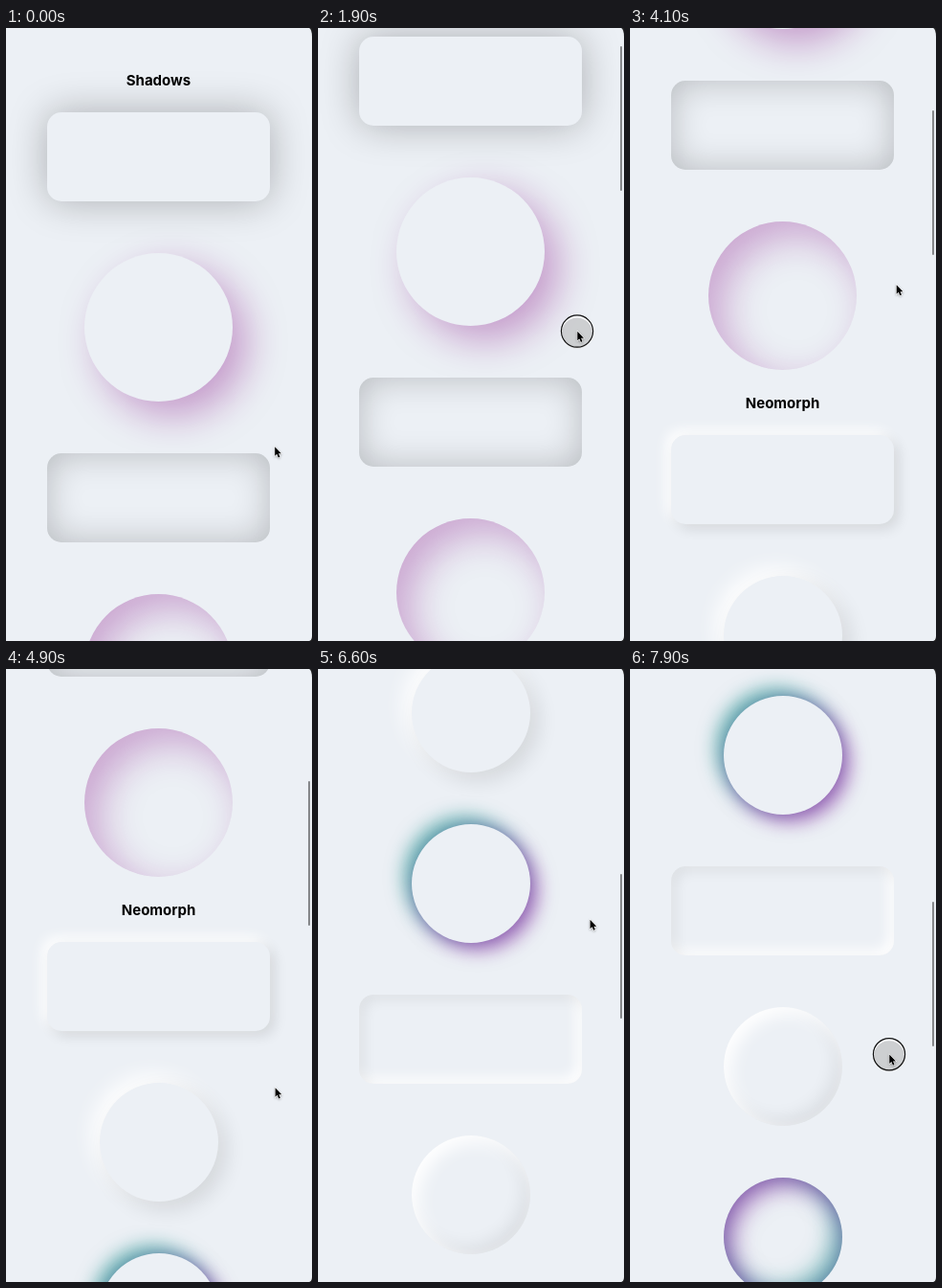
An HTML page that plays this animation: 320 by 640 pixels, repeating every 8 s.

```html
<!DOCTYPE html>
<html lang="en">
<head>
<meta charset="utf-8">
<title>Shadows</title>
<style>
html, body { margin: 0; width: 100%; height: 100%; overflow: hidden; background: #222; }
#stage { position: relative; width: 320px; height: 640px; overflow: hidden; background: #ecf0f5;
  border-radius: 0 3px 3px 0 / 0 9px 5px 0;
  --purple: rgba(98,0,140,.58); --teal: rgba(0,128,128,.62); }
#page, #cursor { position: absolute; left: 0; top: 0; }
#page { width: 319px; }
#page > * { position: absolute; background: #ecf0f5; }
#page > h2 { left: 0; width: 319px; margin: 0; text-align: center; color: #000;
  font: 700 15px/20px Inter, Roboto, sans-serif; background: none; }
.card { left: 43px; width: 233px; height: 93px; border-radius: 15px; }
.big, .disc { border-radius: 50%; }
.big { left: 82px; width: 155px; height: 155px; }
.disc { left: 98px; width: 124px; height: 124px; }
#bar { position: absolute; left: 316px; top: 0; width: 2px; height: 151px; border-radius: 1px; background: #85878a; }
#cursor { width: 0; height: 0; }
#cursor svg { position: absolute; left: -19.5px; top: -20px; }
</style>
</head>
<body>
<div id="stage">
  <div id="page">
    <h2 style="top:45px">Shadows</h2>
    <div class="card" style="top:88px; box-shadow:0 0 40px rgba(0,0,0,.28)"></div>
    <div class="big" style="top:235px; box-shadow:15px 15px 40px rgba(128,0,128,.36)"></div>
    <div class="card" style="top:444px; box-shadow:inset 0 0 36px rgba(0,0,0,.23)"></div>
    <div class="big" style="top:591px; box-shadow:inset 15px 15px 40px rgba(128,0,128,.31)"></div>
    <h2 style="top:771px">Neomorph</h2>
    <div class="card" style="top:814px; box-shadow:5px 5px 14px rgba(0,0,0,.11), -5px -5px 14px #fff"></div>
    <div class="disc" style="top:961px; box-shadow:8px 8px 22px rgba(0,0,0,.11), -8px -8px 22px #fff"></div>
    <div class="disc" style="top:1139px; box-shadow:7px 7px 20px var(--purple), -7px -7px 20px var(--teal)"></div>
    <div class="card" style="top:1317px; box-shadow:inset 5px 5px 14px rgba(0,0,0,.07), inset -5px -5px 14px #fff"></div>
    <div class="disc" style="top:1464px; box-shadow:inset 7px 7px 18px #fff, inset -7px -7px 18px rgba(0,0,0,.08)"></div>
    <div class="disc" style="top:1642px; box-shadow:inset 7px 7px 26px var(--purple), inset -7px -7px 26px var(--teal)"></div>
  </div>
  <div id="bar"></div>
  <div id="cursor">
    <svg width="44" height="46" viewBox="-20 -20 44 46">
      <g id="touch">
        <circle cy="1.2" r="17.2" fill="#fff" fill-opacity=".75"/>
        <circle cy="2" r="16" fill="#c9cacc" fill-opacity=".9"/>
        <circle r="16.6" fill="none" stroke="#111" stroke-width="1.2"/>
      </g>
      <path d="M0 0V10.8L2.4 8.6 4.1 12.6 6 11.8 4.3 7.9H7.6Z" transform="translate(.3 .3) scale(.88)"
        stroke="#fff" stroke-width="1.2" paint-order="stroke"
        style="filter:drop-shadow(0 1px 1px rgba(0,0,0,.3))"/>
    </svg>
  </div>
</div>
<script>
const LOOP = 8000, STEP = 100;
const GLIDE_TIME = 450;    // decay of the momentum after a release
const FINGER_RATIO = 1.1;  // finger travel per pixel of dragged scroll
const HAND_X = 270, HAND_SWAY = 14;

// The first entry only leaves the cursor at its resting place.
const swipes = [
  { down: -200, up: -100, y: 437, drag: 0, glide: 0 },
  { down: 500, up: 2000, y: 404, drag: 90, glide: 107 },
  { down: 3000, up: 4000, y: 434, drag: 151, glide: 209 },
  { down: 5100, up: 6100, y: 437, drag: 165, glide: 381 },
  { down: 7500, up: 8700, y: 419, drag: 110, glide: 0 }
];

const clamp = v => Math.min(1, Math.max(0, v));
const smooth = v => v * v * (3 - 2 * v);
const dragged = (s, t) => s.drag * clamp((t - s.down) / (s.up - s.down)) ** 1.8;
const glided = (s, t) => s.glide * (1 - Math.exp(-Math.max(0, t - s.up) / GLIDE_TIME));
const fingerY = (s, t) => s.y - FINGER_RATIO * dragged(s, t);

const scrollAt = t => swipes.reduce((sum, s) => sum + dragged(s, t) + glided(s, t), 0);

// Follows the finger while pressed, then swings back to the next start.
function cursorAt(t) {
  const i = swipes.findLastIndex(s => s.down <= t);
  const s = swipes[i], next = swipes[i + 1];
  const y = fingerY(s, t);
  if (t < s.up) return { x: HAND_X, y, pressed: true };
  const q = (t - s.up) / (next.down - s.up);
  return {
    x: HAND_X + HAND_SWAY * Math.sqrt(Math.sin(Math.PI * q)),
    y: y + (next.y - y) * smooth(clamp((q - 0.3) / 0.5)),
    pressed: false
  };
}

const [page, bar, cursor, touch] =
  ['page', 'bar', 'cursor', 'touch'].map(id => document.getElementById(id));
const move = (el, x, y) => { el.style.transform = `translate(${x}px, ${y}px)`; };

function draw(now) {
  const t = Math.floor(now % LOOP / STEP) * STEP;
  const scroll = Math.round(scrollAt(t));
  const hand = cursorAt(t);
  move(page, 0, -scroll);
  move(bar, 0, Math.round(2 + scroll * 0.217));
  bar.style.opacity = scroll > 0 ? 1 : 0;
  move(cursor, hand.x, hand.y);
  touch.style.opacity = hand.pressed ? 1 : 0;
}

const start = performance.now();
function tick() {
  draw(performance.now() - start);
  requestAnimationFrame(tick);
}
tick();
</script>
</body>
</html>
```
